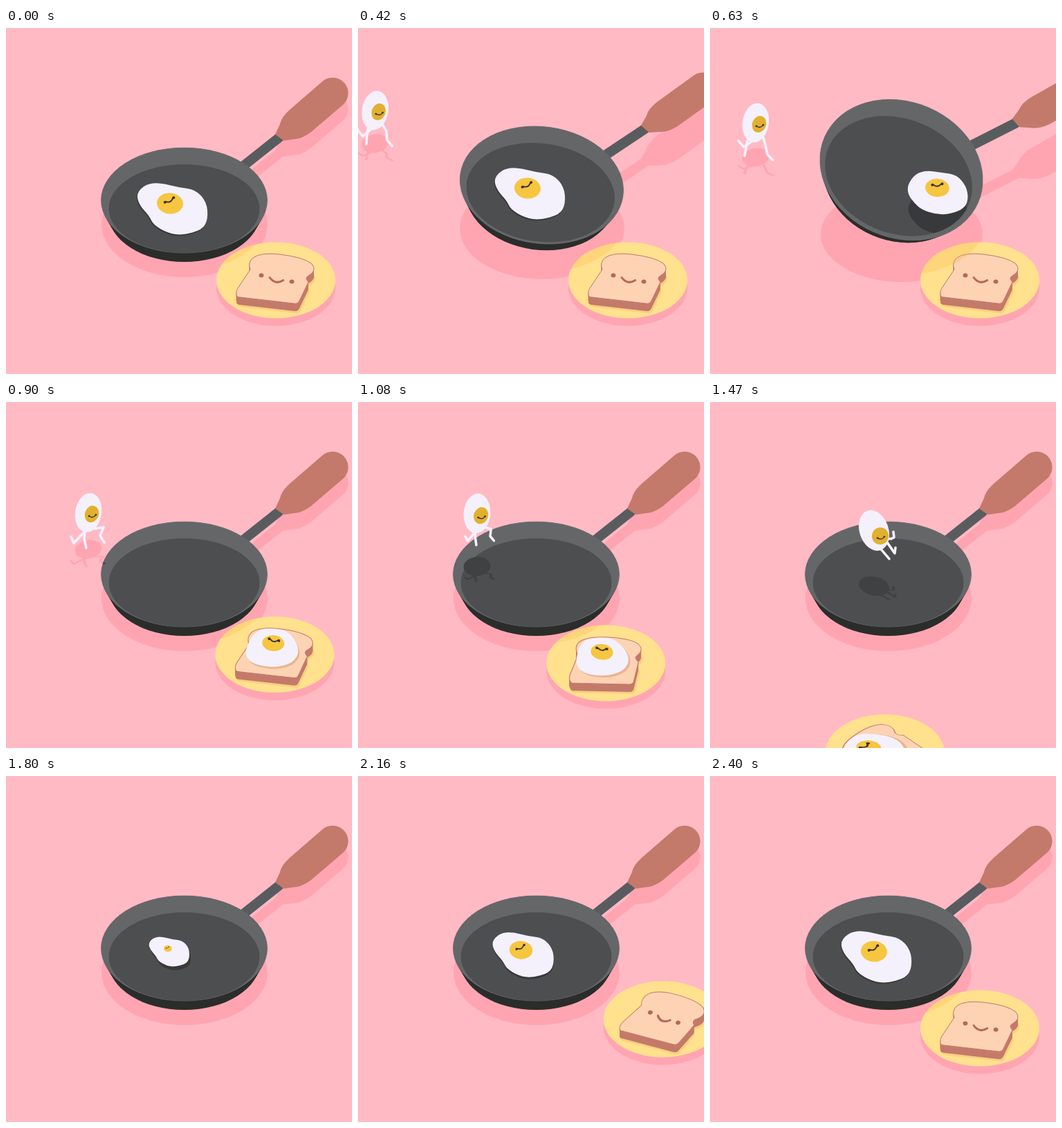
Animation, 500 px wide and 500 px high, one loop 2430 ms. Source, as an HTML page with a canvas:

```html
<!DOCTYPE html>
<html>
<head>
<meta charset="utf-8">
<style>
html, body { margin: 0; height: 100%; overflow: hidden; background: #ffbac4; }
canvas { display: block; width: 100vmin; height: 100vmin; }
</style>
</head>
<body>
<canvas id="stage" width="500" height="500"></canvas>
<script>
const ctx = document.getElementById('stage').getContext('2d');
const LOOP = 2430, STEP = 30, DEG = Math.PI / 180;
const PINK = '#ffbac4', SHADE = '#ffa5b1', WHITE = '#f4f1fd', BROWN = '#c47a6a', INK = '#3d3036';

const lerp = (a, b, u) => a + (b - a) * u;
const ramp = (t, a, b) => Math.min(1, Math.max(0, (t - a) / (b - a)));
const smooth = u => u * u * (3 - 2 * u);
const mix = (a, b, u) => Array.isArray(a) ? a.map((v, i) => mix(v, b[i], u)) : lerp(a, b, u);

function group(draw) { ctx.save(); draw(); ctx.restore(); }

function fill(color, path) {
  ctx.fillStyle = color;
  path ? ctx.fill(path) : ctx.fill();
}

function oval(x, y, rx, ry, color, angle = 0) {
  ctx.beginPath();
  ctx.ellipse(x, y, Math.max(0, rx), Math.max(0, ry), angle * DEG, 0, 7);
  if (color) fill(color);
}

function line(points, width, color) {
  ctx.beginPath();
  points.forEach(p => ctx.lineTo(...p));
  ctx.lineWidth = width;
  ctx.lineCap = ctx.lineJoin = 'round';
  ctx.strokeStyle = color;
  ctx.stroke();
}

function blob(points, color) {
  const n = points.length;
  ctx.beginPath();
  points.forEach((p, i) => {
    const q = points[(i + 1) % n], r = points[(i + 2) % n];
    if (!i) ctx.moveTo((p[0] + q[0]) / 2, (p[1] + q[1]) / 2);
    ctx.quadraticCurveTo(q[0], q[1], (q[0] + r[0]) / 2, (q[1] + r[1]) / 2);
  });
  fill(color);
}

function face(x, y, angle, eye, mouth, size, color) {
  group(() => {
    ctx.translate(x, y);
    ctx.rotate(angle * DEG);
    oval(-eye, 0, size * 1.15, size, color);
    oval(eye, 0, size * 1.15, size, color);
    ctx.beginPath();
    ctx.moveTo(-mouth, 0.5);
    ctx.quadraticCurveTo(0, mouth, mouth, 0.5);
    ctx.lineWidth = size;
    ctx.lineCap = 'round';
    ctx.strokeStyle = color;
    ctx.stroke();
  });
}

// Pan
const handlePath = new Path2D('M-2-7L12-14Q20-21 36-22L100-24.5A22.5 22.5 0 0 1 100 20.5L40 22.5Q26 22 18 17L2 7.5Z');

function panAt(t) {
  const tilt = smooth(ramp(t, 300, 570)) - smooth(ramp(t, 630, 790));
  const lift = 44 * (smooth(ramp(t, 270, 570)) - smooth(ramp(t, 630, 870)));
  const [a, b, c, d] = mix([120, 0, 0, 76], [114, -29, 39, 94], tilt);
  return { tilt, lift, a, b, c, d, x: 257.5 + 19 * tilt, y: 249 - lift };
}

function panOval(pan, dx, dy, sx, sy, color) {
  ctx.beginPath();
  group(() => {
    ctx.transform(pan.a, pan.c, pan.b, pan.d, pan.x + dx, pan.y + dy);
    ctx.ellipse(0, 0, sx, sy, 0, 0, 7);
  });
  if (color) fill(color);
}

function handle(pan, dy, stem, grip) {
  group(() => {
    ctx.translate(pan.x + 1.146 * pan.a - 1.197 * pan.b, pan.y + 1.146 * pan.c - 1.197 * pan.d + dy);
    ctx.rotate(lerp(-38.5, -27, pan.tilt) * DEG);
    ctx.scale(1 + 0.05 * pan.tilt, 1 + 0.05 * pan.tilt);
    line([[-80, 0], [0, 0]], 14, stem);
    fill(grip, handlePath);
  });
}

function panShadow(pan, dy, color) {
  const u = pan.tilt;
  oval(pan.x + 0.5, lerp(284, 298, u) + dy, lerp(120, 117, u), lerp(76, 69, u), color);
}

function drawPan(pan) {
  const u = pan.tilt;
  handle(pan, 0, '#595c5e', BROWN);
  for (let i = 0; i <= 12; i++) {
    const k = i / 12, s = 1 - 0.092 * k;
    panOval(pan, -6 * u * k, lerp(20, 13, u) * k, s, s, '#2b2d2a');
  }
  panOval(pan, 0, 0, 1, 1, '#646668');
  ctx.lineWidth = 0.7;
  ctx.strokeStyle = '#737577';
  ctx.stroke();
  panOval(pan, -4 * u, lerp(12, 9, u), 0.908, 0.842, '#4c4e50');
}

// Plate and toast, turning on the table around a far point
const toastPath = new Path2D('M333 385Q332 381 335 376L353 349Q349 339 357 332Q368 324 395 327Q430 331 442 341Q450 351 437 358Q431 361 437 367L424 394Q422 399 416 398L338 389Q333 389 333 385Z');

function plateAngle(t) {
  if (t < 1800) return 28 + 1.57e-4 * Math.max(0, t - 850) ** 2;
  return 28 - 2.1e-4 * Math.max(0, 2400 - t) ** 2;
}

function turnTable(t, dy = 0) {
  ctx.translate(512, 511 + dy);
  ctx.scale(1, 0.64);
  ctx.rotate((28 - plateAngle(t)) * DEG);
  ctx.scale(1, 1 / 0.64);
  ctx.translate(-512, -511);
}

function plateOval(t, dy, color) {
  group(() => { turnTable(t, dy); oval(390, 364.5, 86, 55, color); });
}

function drawPlate(t, pan) {
  plateOval(t, 11, SHADE);
  plateOval(t, 0, '#ffe18e');
  group(() => { turnTable(t, 12); ctx.translate(2, 2); fill('#f8cf80', toastPath); });
  for (let dy = 11; dy >= 0; dy--) group(() => { turnTable(t, dy); fill(BROWN, toastPath); });
  group(() => {
    turnTable(t);
    fill('#fdd3b4', toastPath);
    ctx.lineWidth = 1;
    ctx.strokeStyle = BROWN;
    ctx.stroke(toastPath);
    face(391, 362, 11.5, 22.5, 10, 3, '#b5685b');
  });
  group(() => {
    plateOval(t, 0);
    ctx.clip();
    panShadow(pan, -10, 'rgba(255,176,70,.25)');
  });
}

// Fried egg
const panEgg = [[-52, -22], [-38, -36], [-18, -38], [10, -31], [34, -28], [50, -10], [52, 14], [44, 30], [15, 38], [-6, 35], [-27, 23], [-33, 10], [-47, -5]];
const toastEgg = [[-36, -3], [-27, -21], [-13, -28], [4, -28], [22, -25], [35, -10], [39, 5], [34, 16], [23, 24], [2, 28], [-19, 25], [-33, 19], [-39, 8]];

function friedEgg(x, y, u, size, yolk, shadow) {
  const points = mix(panEgg, toastEgg, u);
  const shape = color => { ctx.scale(size, size); blob(points, color); };
  group(() => {
    if (shadow.clip) { shadow.clip(); ctx.clip(); }
    ctx.translate(x + shadow.x, y + shadow.y);
    shape(shadow.color);
  });
  group(() => { ctx.translate(x, y); shape(WHITE); });
  group(() => {
    ctx.translate(x + lerp(-3, 2, u) * size, y + lerp(-8, -7, u) * size);
    ctx.scale(yolk, yolk);
    oval(0, 0, lerp(19, 16, u), lerp(15, 11.5, u), '#f6c63f', 5);
    face(lerp(-1, 1, u), -5, lerp(-28, 12, u), 7, 5, 1.9, INK);
  });
}

function tossedEgg(t, pan) {
  const u = ramp(t, 500, 737), rest = 1 - u, hop = 4 * u * rest;
  const clip = () => panOval(pan, -4 * pan.tilt, lerp(12, 9, pan.tilt), 0.908, 0.842);
  const shadow = u < 1
    ? { x: -1 + 2 * hop, y: 2 + 27 * hop, color: '#38393b', clip }
    : { x: 2, y: 3, color: '#eab592' };
  group(() => {
    if (u === 1) turnTable(t);
    friedEgg(lerp(240, 386, u) + 19 * pan.tilt * rest,
             lerp(261.5, 355, u) - pan.lift * rest - 55 * hop, u, 1, 1, shadow);
  });
}

function freshEgg(t) {
  const left = 1 - ramp(t, 1600, 2400);
  const size = (1 - 0.618 * left ** 1.3) * ramp(t, 1560, 1620);
  const yolk = Math.max(0, 1 - 1.19 * left ** 1.9);
  friedEgg(lerp(240, 234, left), lerp(261.5, 251.5, left), 0, size, yolk,
    { x: lerp(-1, 3, left), y: 2 + 8 * (1 - size), color: '#38393b' });
}

// Walking egg: limbs are blended between two strides and a leap
const strideA = [[[-6, 27], [-17, 35], [-25, 26]], [[-12, 26], [-14, 37], [-16, 48]], [[10, 18], [14, 32], [17, 46], [25, 54]]];
const strideB = [[[-4, 26], [-21, 44], [-25, 35]], [[-5, 26], [-6, 38], [-3, 51]], [[9, 23], [22, 21], [17, 33], [23, 43]]];
const leap = [[[10, 27], [16, 34], [22, 41]], [[18, 16], [30, 33], [31, 25]], [[18, 12], [25, 12], [29, 10], [28, 2]]];

function walkerAt(t) {
  const air = ramp(t, 1043, 1290), glide = 1 - (1 - air) ** 2;
  const walked = Math.min(t, 1043) - 630;
  const swing = 0.5 - 0.5 * Math.cos(Math.PI * walked / 90);
  const jump = smooth(ramp(t, 1030, 1220));
  return {
    jump,
    x: lerp(66 + 0.1963 * walked, 237, glide),
    y: t < 1043 ? 137 + 0.085 * walked : 138 + 0.0009 * (t - 1240) ** 2,
    floor: lerp(187 + 0.096 * walked, 266, glide),
    limbs: mix(mix(strideA, strideB, swing), leap, jump),
    melt: 1 - ramp(t, 1530, 1620)
  };
}

function walkerShape(w, color) {
  w.limbs.forEach(limb => line(limb, 3.6, color));
  oval(0, 0, lerp(19, 21, w.jump), lerp(28.5, 30, w.jump), color, lerp(9, -18, w.jump));
}

function walkerShadow(w, color) {
  group(() => {
    ctx.translate(w.x, w.floor);
    ctx.scale(w.melt, 0.48 * w.melt);
    walkerShape(w, color);
  });
}

function drawWalker(w) {
  group(() => {
    ctx.translate(w.x, w.y);
    ctx.scale(w.melt, w.melt);
    walkerShape(w, WHITE);
    const x = lerp(5, 9, w.jump), y = lerp(2, 8, w.jump);
    oval(x, y, lerp(10, 12, w.jump), 12.3, '#e2b02f', 20);
    face(x + 1, y + 2, -10, 5, 4.5, 1.3, INK);
  });
}

function draw(t) {
  const pan = panAt(t), walker = walkerAt(t), walking = t >= 270 && t < 1620;
  ctx.fillStyle = PINK;
  ctx.fillRect(0, 0, 500, 500);
  panShadow(pan, 0, SHADE);
  handle(pan, 23 + 1.15 * pan.lift, SHADE, SHADE);
  if (walking) walkerShadow(walker, SHADE);
  drawPlate(t, pan);
  drawPan(pan);
  if (walking) group(() => {
    panOval(pan, 0, 0, 1, 1);
    ctx.clip();
    walkerShadow(walker, '#3f4143');
  });
  if (t < 1800) tossedEgg(t, pan);
  if (t >= 1560) freshEgg(t);
  if (walking) drawWalker(walker);
}

const start = performance.now();
function tick() {
  const t = (performance.now() - start) % LOOP;
  draw(Math.floor(t / STEP) * STEP);
  requestAnimationFrame(tick);
}
tick();
</script>
</body>
</html>
```
